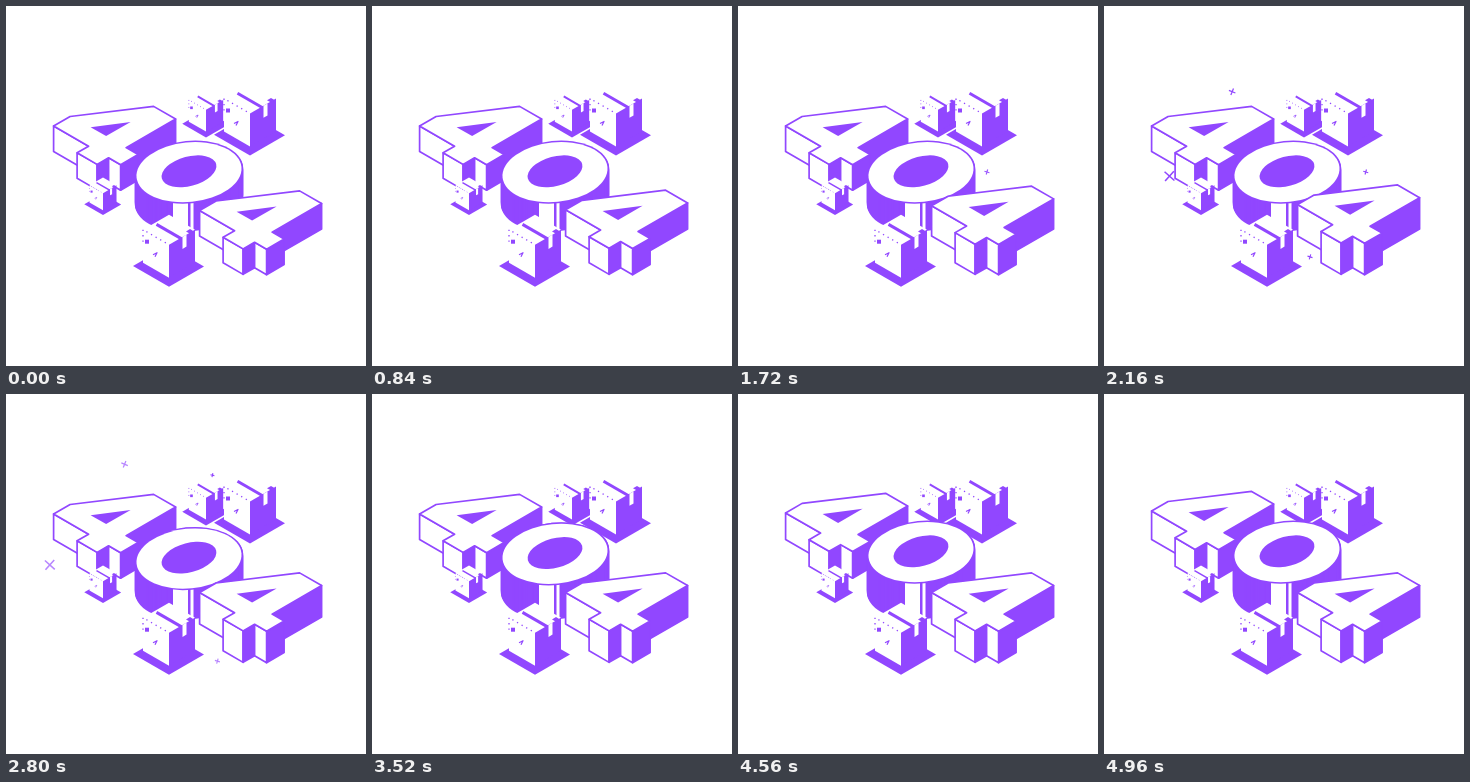
An HTML page with a canvas for the animation above (5 s loop, 360x360 px).

```html
<!DOCTYPE html>
<html lang="en">
<head>
<meta charset="utf-8">
<title>404</title>
<style>
html, body { margin: 0; width: 100%; height: 100%; overflow: hidden; background: #fff; }
canvas { display: block; width: 360px; height: 360px; }
</style>
</head>
<body>
<canvas id="stage"></canvas>
<script>
const LOOP = 5000;
const PURPLE = '#9147ff';
const WHITE = '#fff';
const canvas = document.getElementById('stage');
const ctx = canvas.getContext('2d');
const dpr = window.devicePixelRatio || 1;
canvas.width = canvas.height = 360 * dpr;

const clamp = v => Math.max(0, Math.min(1, v));

// Isometric floor: u runs right and down, v right and up, z is height
const iso = (u, v, z = 0) => [u + v, (u - v) * 0.577 - z];

// The parts rise one after another
const rise = (t, turn) => (1 - Math.cos(Math.PI * clamp((t - 440 - turn * 1800) / 1850))) / 2;

function at(x, y, paint) {
  ctx.save();
  ctx.translate(x, y);
  paint();
  ctx.restore();
}

function trace(points) {
  ctx.beginPath();
  points.forEach(p => ctx.lineTo(...p));
}

function poly(points, fill, outline) {
  trace(points);
  ctx.closePath();
  ctx.fillStyle = fill;
  ctx.fill();
  if (outline) stroke(1.7);
}

function stroke(width) {
  ctx.lineWidth = width;
  ctx.strokeStyle = PURPLE;
  ctx.stroke();
}

function rect(x, y, w, h, color = PURPLE) {
  ctx.fillStyle = color;
  ctx.fillRect(x, y, w, h);
}

// The digit on the floor grid: a stem crossed by a bar, clockwise from the apex
const stem = { left: 35, right: 55, top: 67, foot: -11.5 };
const bar = { end: 67, top: 17.5 };
const FOUR = [
  iso(stem.left - 2, stem.top), iso(stem.right, stem.top),
  iso(stem.right, bar.top), iso(bar.end, bar.top),
  iso(bar.end, 0), iso(stem.right, 0),
  iso(stem.right, stem.foot), iso(stem.left, stem.foot),
  iso(stem.left, 0), iso(0, 0), iso(0, bar.top - 1)
];
const HOLE = [iso(19.5, bar.top), iso(stem.left, bar.top), iso(stem.left, 42)];

// Edges running leftwards face the viewer; far walls come first
const WALLS = FOUR.map((p, i) => [p, FOUR[(i + 1) % FOUR.length]])
  .filter(([p, q]) => q[0] < p[0])
  .sort((a, b) => a[0][1] + a[1][1] - b[0][1] - b[1][1]);

function four(x, y, lift) {
  const down = ([px, py]) => [px, py + 25.5 + lift];
  at(x, y - lift, () => {
    WALLS.forEach(([p, q]) => poly([p, q, down(q), down(p)], q[1] < p[1] ? WHITE : PURPLE, true));
    poly(FOUR, WHITE, true);
    poly(HOLE, PURPLE);
  });
}

function oval(y, rx, ry, tilt, fill) {
  ctx.beginPath();
  ctx.ellipse(183, y, rx, ry, tilt, 0, Math.PI * 2);
  ctx.fillStyle = fill;
  ctx.fill();
}

function zero(lift) {
  const top = 166.2 - lift;
  for (let y = 194; y > top; y--) oval(y, 54.4, 31.3, -0.1, PURPLE);
  rect(167, top, 15, 225 - top, WHITE);
  rect(184.5, top, 3, 225 - top, WHITE);
  oval(top, 54.4, 31.3, -0.1, PURPLE);
  oval(top, 52.7, 29.8, -0.1, WHITE);
  oval(top - 0.9, 28.1, 14.7, -0.26, PURPLE);
}

// Parcel on a diamond shadow; the origin is the front corner of the shadow
function parcel(x, y, scale) {
  const w = 26, foot = 9, top = 42, tape = 13.5;
  at(x, y, () => {
    ctx.scale(scale, scale);
    poly([iso(-36, 0), iso(0, 0), iso(0, 35), iso(-36, 35)], PURPLE);
    poly([iso(-w, 0, foot), iso(0, 0, foot), iso(0, 0, top), iso(-w, 0, top)], WHITE);
    poly([iso(-w, 0, top), iso(0, 0, top), iso(0, w, top), iso(-w, w, top)], WHITE);
    poly([iso(0, 0, foot), iso(0, w, foot), iso(0, w, top), iso(0, 0, top)], PURPLE);
    trace([iso(-w, tape, top - 2.5), iso(0, tape, top - 2.5)]);
    stroke(3);
    poly([iso(0, tape, 30), iso(0, tape + 4, 30), iso(0, tape + 4, top), iso(0, tape, top)], WHITE);

    // Worn edge, label and marks
    ctx.setLineDash([1.3, 4]);
    trace([iso(-w, 0, top - 12), iso(-w, 0, top), iso(-3, 0, top)]);
    stroke(1.3);
    ctx.setLineDash([]);
    poly([iso(-3, 20, top), iso(1, 20, top), iso(1, 24, top), iso(-3, 24, top)], PURPLE);
    rect(-24, -47, 4, 4);
    trace([[-16, -32], [-12, -34], [-14, -30]]);
    stroke(1.2);
  });
}

// Sparks burst outwards and slow down: resting place, radius, moment they vanish
const SPARKS = [
  [41.4, 171, 6.6, 3100],
  [117.5, 68.5, 3.5, 3100],
  [212, 269, 2.6, 3100],
  [268, 166, 2.6, 2750],
  [209.5, 72, 2, 3500]
];

function spark([x, y, r, end], t) {
  const age = t - end + 1120;
  if (age < 0 || t > end) return;
  const left = (end - t) / 1000;
  const reach = 1 - 0.2 * left * left;
  at(178 + (x - 178) * reach, 166 + (y - 166) * reach, () => {
    ctx.rotate(r * 0.11);
    ctx.globalAlpha = clamp(age / 100) * clamp(left * 2.2);
    trace([[-r, 0], [r, 0]]);
    ctx.moveTo(0, -r);
    ctx.lineTo(0, r);
    stroke(0.9 + r * 0.1);
  });
}

function draw(t) {
  ctx.setTransform(dpr, 0, 0, dpr, 0, 0);
  ctx.lineJoin = 'round';
  rect(0, 0, 360, 360, WHITE);
  parcel(200, 131.5, 0.66);
  parcel(244, 149.5, 1);
  four(47.6, 120, 6 * rise(t, 2));
  zero(8 * rise(t, 1));
  four(193.6, 204.5, 6 * rise(t, 0));
  parcel(97, 209, 0.52);
  parcel(163, 280.7, 1);
  SPARKS.forEach(s => spark(s, t));
}

const start = performance.now();
function tick() {
  draw((performance.now() - start) % LOOP);
  requestAnimationFrame(tick);
}
tick();
</script>
</body>
</html>
```
